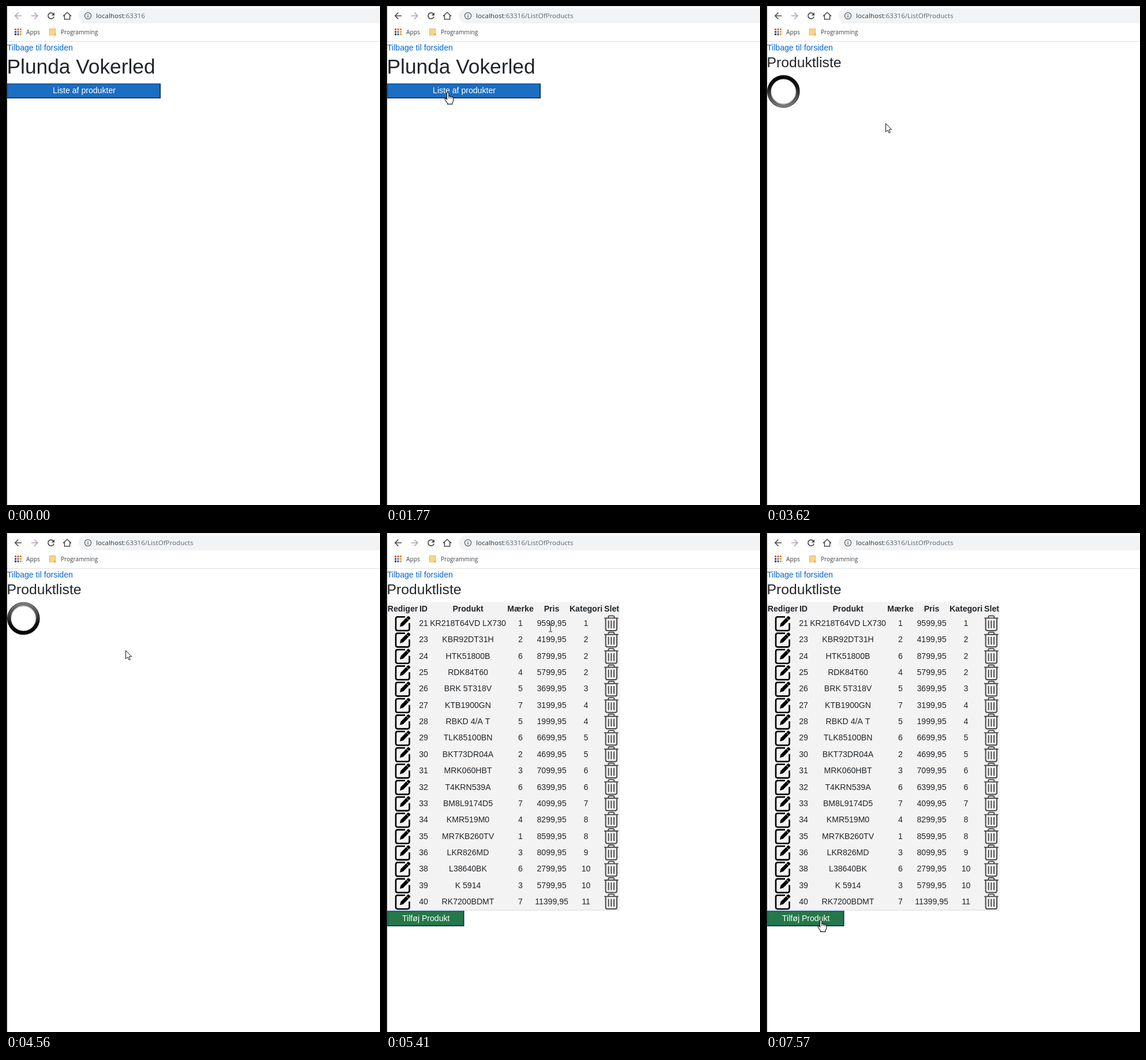
These frames come from a looping animation (648x864 px, 8000 ms). An HTML page with a canvas:

```html
<!DOCTYPE html>
<html lang="da">
<head>
<meta charset="utf-8">
<title>Produktliste</title>
<style>
  html, body { margin: 0; width: 100%; height: 100%; overflow: hidden; background: #fff; }
  canvas { display: block; width: 648px; height: 864px; }
</style>
</head>
<body>
<canvas id="stage"></canvas>
<script>
const LOOP = 8000, W = 648, H = 864;
const canvas = document.getElementById('stage');
const ctx = canvas.getContext('2d');
const dpr = window.devicePixelRatio || 1;
canvas.width = W * dpr;
canvas.height = H * dpr;

const PAGE = '"Liberation Sans", Arial, sans-serif';
const CHROME = '"Open Sans", "Noto Sans", sans-serif';
const INK = '#212529', ICON = '#4b4e53', FADED = '#b7a0bd';

const products = `21|KR218T64VD LX730|1|9599,95|1
23|KBR92DT31H|2|4199,95|2
24|HTK51800B|6|8799,95|2
25|RDK84T60|4|5799,95|2
26|BRK 5T318V|5|3699,95|3
27|KTB1900GN|7|3199,95|4
28|RBKD 4/A T|5|1999,95|4
29|TLK85100BN|6|6699,95|5
30|BKT73DR04A|2|4699,95|5
31|MRK060HBT|3|7099,95|6
32|T4KRN539A|6|6399,95|6
33|BM8L9174D5|7|4099,95|7
34|KMR519M0|4|8299,95|8
35|MR7KB260TV|1|8599,95|8
36|LKR826MD|3|8099,95|9
38|L38640BK|6|2799,95|10
39|K 5914|3|5799,95|10
40|RK7200BDMT|7|11399,95|11`.split('\n').map(row => row.split('|'));
const columns = [65, 142, 233, 287, 346.5];

// time, x, y, shape
const track = [
  [70, 539, 801, 'arrow'], [300, 360, 520, 'arrow'], [530, 200, 250, 'arrow'],
  [690, 121, 151, 'hand'], [830, 110, 153, 'hand'], [900, 109, 152.5, 'hand'],
  [1060, 109, 152.5, 'hand'], [1070, 108, 149.5, 'hand'], [2459, 108, 149.5, 'hand'],
  [2460, 108, 150, 'arrow'], [2690, 114, 158, 'arrow'], [3230, 195, 195, 'arrow'],
  [3400, 207, 203, 'arrow'], [5040, 207, 203, 'arrow'], [5190, 150, 188, 'arrow'],
  [5270, 118, 172, 'beam'], [5340, 205, 167, 'beam'], [5410, 285, 164.5, 'beam'],
  [5570, 291, 157, 'beam'], [5730, 291, 157, 'beam'], [5870, 305, 162, 'beam'],
  [5950, 312, 165, 'arrow'], [6040, 312, 165, 'arrow'], [6330, 428, 235, 'arrow'],
  [6600, 300, 335, 'arrow'], [6800, 180, 382, 'beam'], [6870, 153.5, 387, 'beam'],
  [6950, 145, 430, 'arrow'], [7180, 94, 658, 'hand'], [7260, 100, 670, 'hand'],
  [7400, 100, 670, 'hand'], [7410, 97, 670, 'hand'], [7560, 97, 670, 'hand'],
  [7570, 96, 670, 'hand']
];

function text(s, x, y, font, color = INK, align = 'left') {
  ctx.font = font;
  ctx.fillStyle = color;
  ctx.textAlign = align;
  ctx.fillText(s, x, y);
}

function rect(x, y, w, h, color) {
  ctx.fillStyle = color;
  ctx.fillRect(x, y, w, h);
}

function stroke(d, color, width) {
  ctx.strokeStyle = color;
  ctx.lineWidth = width;
  ctx.stroke(new Path2D(d));
}

function fill(d, color) {
  ctx.fillStyle = color;
  ctx.fill(new Path2D(d));
}

function at(x, y, draw) {
  ctx.save();
  ctx.translate(x, y);
  draw();
  ctx.restore();
}

function navArrow(x, dir, color) {
  at(x, 17, () => {
    ctx.scale(dir, 1);
    stroke('M6 0H-5M.3 -5.6L-5.3 0L.3 5.6', color, 1.6);
  });
}

function toolbar(listPage) {
  rect(0, 0, W, 1, '#dee1e6');
  navArrow(21, 1, listPage ? ICON : FADED);
  navArrow(49.5, -1, FADED);
  at(78, 17, () => {
    stroke('M4.2 -3.2A5.2 5.2 0 1 0 5.1 1.4', ICON, 1.7);
    fill('M6 -6V-.6H.6Z', ICON);
  });
  at(106, 17, () => stroke('M-7 .6L0 -6L7 .6M-4.6 -1V6H4.6V-1', ICON, 1.6));

  ctx.fillStyle = '#f1f3f4';
  ctx.beginPath();
  ctx.roundRect(126, 4, 560, 26, 13);
  ctx.fill();
  at(142, 17, () => {
    stroke('M5.6 0A5.6 5.6 0 1 1 -5.6 0A5.6 5.6 0 1 1 5.6 0', '#5f6368', 1.3);
    rect(-.7, -3, 1.4, 1.4, '#5f6368');
    rect(-.7, -.7, 1.4, 3.9, '#5f6368');
  });
  const font = '11.6px ' + CHROME;
  text('localhost', 156, 21, font, '#35383c');
  const hostEnd = 156 + ctx.measureText('localhost').width;
  text(':63316' + (listPage ? '/ListOfProducts' : ''), hostEnd, 21, font, '#62666b');

  const dots = ['#d9602f', '#d9602f', '#e08a2c', '#2f4d86', '#4a78b8', '#e0a13a', '#26355c', '#2f4d86', '#e0a13a'];
  dots.forEach((c, i) => rect(15 + i % 3 * 4.5, 39 + Math.floor(i / 3) * 4.3, 3, 3, c));
  text('Apps', 35, 49, '10.2px ' + CHROME, '#3c4043');
  rect(75, 39, 11, 12, '#e3b566');
  rect(76, 40, 9, 10.5, '#f8d58c');
  rect(83.5, 48, 3, 3, '#e6a94e');
  text('Programming', 95, 49, '10.1px ' + CHROME, '#3c4043');
  rect(0, 61, W, 1, '#dcdee1');
}

function button(x, y, w, h, label, color, pressed) {
  const light = '#1861ac', dark = '#0d2f5b', edge = 1.7;
  rect(x, y, w, h, pressed ? light : dark);
  fill(`M${x} ${y}h${w}l${-edge} ${edge}H${x + edge}V${y + h - edge}L${x} ${y + h}Z`, pressed ? dark : light);
  rect(x + edge, y + edge, w - 2 * edge, h - 2 * edge, color);
  text(label, x + w / 2 + .5, Math.round(y + h / 2 + 4.4), '14.1px ' + PAGE, '#fff', 'center');
}

function frontPage(t) {
  text('Plunda Vokerled', 1.5, 117, '35.3px ' + PAGE);
  const pressed = t >= 1530 && t < 1620;
  button(2, 134, 266, 26, 'Liste af produkter', pressed ? '#1a62ae' : '#1b6ec2', pressed);
}

function spinner(t) {
  at(30.3, 148, () => {
    ctx.rotate((t - 2690) / 1867 * Math.PI * 2);
    const ring = (r, width, stops) => {
      const g = ctx.createLinearGradient(0, -28, 0, 28);
      stops.forEach((c, i) => g.addColorStop(i / (stops.length - 1), c));
      ctx.strokeStyle = g;
      ctx.lineWidth = width;
      ctx.beginPath();
      ctx.arc(0, 0, r, 0, Math.PI * 2);
      ctx.stroke();
    };
    ring(24.9, 6.8, ['#5c5e5e', '#3c3d41', '#0a0a0c', '#000']);
    ring(25.6, 2, ['#929493', '#55565c', '#111', '#000']);
    ring(22.6, .9, ['#f0f0f0', '#a0a0a4', '#303030', '#000']);
  });
}

function editIcon(y) {
  at(29, y, () => {
    stroke('M4 -10.7H-9Q-12 -10.7 -12 -7.7V10Q-12 13 -9 13H8.5Q11.5 13 11.5 10V0', '#000', 2.6);
    fill('M-5 6.4L-3.6 .6L8.4 -11.4Q9.8 -12.8 11.3 -11.3L12.6 -10Q14 -8.6 12.6 -7.2L.8 4.8Z', '#000');
    stroke('M6.2 -9.2L10.6 -4.8', '#f3f3f3', .9);
  });
}

function trashIcon(y) {
  at(390.3, y, () => {
    const c = '#4a4749';
    stroke('M-12.2 -8.6H12.2M-5 -9V-10.5Q-5 -12.6 -3 -12.6H3Q5 -12.6 5 -10.5V-9', c, 1.9);
    stroke('M-9.7 -8V10Q-9.7 12.9 -6.8 12.9H6.8Q9.7 12.9 9.7 10V-8', c, 2);
    stroke('M-4.7 -4.5V9M0 -4.5V9M4.7 -4.5V9', c, 1.9);
  });
}

function table() {
  rect(2, 119.5, 403, 533.5, '#f3f3f3');
  rect(2, 652.5, 403, 1, '#d5d7d9');
  const heads = ['Rediger', 'ID', 'Produkt', 'Mærke', 'Pris', 'Kategori', 'Slet'];
  [29, ...columns, 391].forEach((x, i) =>
    text(heads[i], x, 135.5, 'bold 14.1px ' + PAGE, INK, 'center'));
  products.forEach((cells, i) => {
    const y = 156 + i * 28.35;
    editIcon(y);
    cells.forEach((s, k) => text(s, columns[k], y + 5, '14.1px ' + PAGE, INK, 'center'));
    trashIcon(y);
  });
  button(2, 654, 133.5, 27, 'Tilføj Produkt', '#247849', false);
}

const cursors = {
  arrow() {
    const d = 'M.5 .5V14.9L3.9 11.8L6.1 16.9L8.3 15.9L6.1 11H10.6Z';
    fill(d, '#fff');
    stroke(d, '#111', 1);
  },
  hand() {
    const d = 'M-2.5 13V1.7Q-2.5 .3 -.9 .3Q.7 .3 .7 1.7V6.6Q2.2 5.6 3.3 7.2Q4.9 6.4 5.9 8' +
      'Q8.6 7.4 8.6 10V14Q8.6 16.5 6.9 18.2V20.4H-1.6V18.8L-5.6 13Q-6.4 11.4 -5 10.6Q-3.8 10.2 -2.5 12';
    fill(d, '#fff');
    stroke(d, '#111', 1.1);
    stroke('M.7 6.6V10.5M3.3 7.2V10.5M5.9 8V11', '#111', .9);
  },
  beam() {
    stroke('M-3 -6.5H-.7L0 -6L.7 -6.5H3M0 -6V6M-3 6.5H-.7L0 6L.7 6.5H3', '#222', 1);
  }
};

function cursor(t) {
  if (t < track[0][0]) return;
  let i = track.length - 1;
  while (track[i][0] > t) i--;
  const a = track[i], b = track[i + 1] || a;
  const p = b === a ? 0 : (t - a[0]) / (b[0] - a[0]);
  at(a[1] + (b[1] - a[1]) * p, a[2] + (b[2] - a[2]) * p, cursors[a[3]]);
}

function draw(t) {
  ctx.setTransform(dpr, 0, 0, dpr, 0, 0);
  rect(0, 0, W, H, '#fff');
  toolbar(t >= 1770);
  text('Tilbage til forsiden', 2, 77, '14.1px ' + PAGE, '#0366d6');
  if (t < 2460) {
    frontPage(t);
  } else {
    text('Produktliste', 1.5, 106, '24.7px ' + PAGE);
    if (t < 4630) spinner(t);
    else table();
  }
  rect(0, 0, 1.8, H, '#000');
  cursor(t);
}

function loop(now) {
  draw(now % LOOP);
  requestAnimationFrame(loop);
}
draw(0);
requestAnimationFrame(loop);
</script>
</body>
</html>
```
